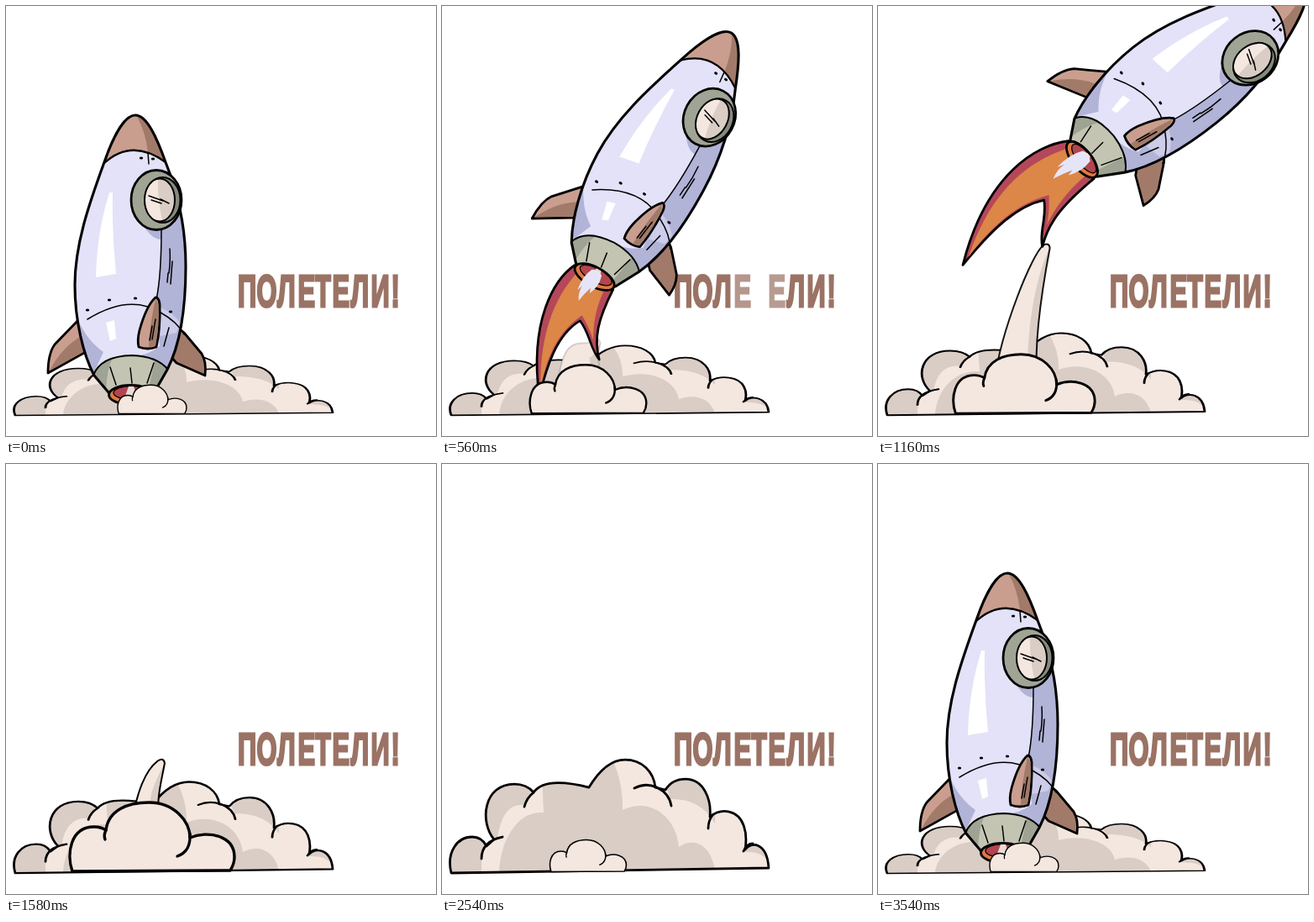
An HTML page that plays this animation: 512 by 512 pixels, repeating every 3600 ms.

```html
<!DOCTYPE html>
<html lang="ru">
<head>
<meta charset="utf-8">
<title>Rocket launch</title>
<style>
  html, body { margin: 0; width: 100%; height: 100%; overflow: hidden; background: #fff; }
  svg { display: block; width: 100%; height: 100%; }
  .ink { stroke: #000; stroke-width: 2.8; stroke-linecap: round; stroke-linejoin: round; }
  .line { fill: none; }
  .thin { fill: none; stroke-width: 1.5; }
  .light { fill: #f4e7e0; }
  .dark { fill: #d9cdc6; }
  .cone { fill: #c99e8f; }
  .fin { fill: #a27a6a; }
  .shade { fill: #b1b3d7; }
  #word { font: bold 54px "Liberation Sans", Arial, sans-serif; fill: #9b7365; stroke: #9b7365; stroke-width: 3.2; }
</style>
</head>
<body>
<svg viewBox="0 0 512 512">
  <defs>
    <path id="cloudShape" d="M11 487C5 462 18 444 36 444C44 444 50 449 53 455L62 447C44 425 50 381 86 381C97 381 105 386 109 391C118 378 140 376 175 385C190 360 205 352 218 352C238 352 252 366 254 385L266 388C272 378 282 375 290 375C312 375 321 400 319 420Q330 411 342 414C360 418 364 440 361 459C368 449 387 450 389 481Z"/>
    <path id="hull" d="M154 130C140 130 126 160 117 186C98 238 82 285 82 332C82 375 92 415 105 440L122 460C132 473 166 473 176 461L192 433C208 402 214 355 214 310C214 260 204 220 190 186C180 158 168 130 154 130Z"/>
    <clipPath id="inCloud"><use href="#cloudShape"/></clipPath>
    <clipPath id="inHull"><use href="#hull"/></clipPath>
    <clipPath id="inGlass"><ellipse cx="183" cy="231" rx="18" ry="25.5"/></clipPath>
  </defs>

  <g id="word" aria-label="ПОЛЕТЕЛИ!"></g>

  <g id="cloud">
    <use href="#cloudShape" class="light"/>
    <g clip-path="url(#inCloud)" class="dark">
      <path d="M5 490V440H54Q46 458 47 490Z"/>
      <path d="M45 375H112L99 406Q72 402 66 446L50 440Z"/>
      <path d="M119 370H175L204 354Q216 382 215 412C248 396 279 420 282 456C300 444 322 452 326 490H68C68 452 88 412 121 415Z"/>
      <path d="M262 370H325V428Q308 398 272 399Z"/>
      <path d="M360 462V448H392V478Q382 460 360 462Z"/>
    </g>
    <use href="#cloudShape" class="ink line"/>
    <path class="ink line" d="M47 470C47 455 57 447 72 444M98 408Q101 397 109 391M229 386C248 376 270 388 273 407M317 434Q317 425 322 418M359 461Q363 452 370 452"/>
  </g>

  <g id="column">
    <path id="trail" class="light"/>
    <path id="trailShade" class="dark"/>
    <path id="trailEdge" class="ink line" style="stroke-width:2"/>
  </g>

  <g id="ship">
    <g id="flame">
      <path id="flameOuter" class="ink" fill="#b4485a"/>
      <path id="flameInner" fill="#dc8647"/>
    </g>
    <g transform="translate(-148 -462)">
      <path class="ink cone" d="M86 374L58 403Q50 414 50 437L93 413Q99 395 86 374Z"/>
      <path class="fin" d="M92 392Q67 405 52 434L92 412Q96 403 92 392Z"/>
      <path class="ink fin" d="M206 384L212 389L233 414Q239 424 237 440L203 425L194 415Z"/>
      <use href="#hull" fill="#e3e2f8"/>
      <g clip-path="url(#inHull)">
        <path class="shade" d="M164 262Q174 278 185 278Q183 330 178 350L183 405Q170 416 150 417L196 435L230 360V235Z"/>
        <path class="shade" d="M85 372Q96 398 116 412L103 440L82 410Z"/>
        <path fill="#e3e2f8" d="M184 359Q200 366 207 377L203 389L184 393Z" opacity=".55"/>
        <path class="cone" d="M117 187Q150 157 190 186V120H100Z"/>
        <path class="fin" d="M154 128Q166 148 169 174Q180 178 190 186L196 150Z"/>
        <path class="ink line" d="M117 187Q150 157 190 186" style="stroke-width:2.2"/>
        <path fill="#c3c5b2" d="M98 445Q110 417 150 416Q184 418 196 436V475H98Z"/>
        <path fill="#9fa394" d="M98 448Q107 424 128 418Q118 433 119 475H98ZM177 421L200 436V475H166Z"/>
        <path class="ink line" d="M104 440Q112 417 150 416Q180 417 193 433" style="stroke-width:2"/>
        <path class="ink thin" d="M124 430L131 451M148 431L150 449M176 425L168 449"/>
      </g>
      <path fill="#fff" d="M123 222Q108 270 107 323L131 319Q126 270 127 222ZM119 377L129 374L131 396L124 399Z"/>
      <use href="#hull" class="ink line" style="stroke-width:3.1"/>
      <path class="ink thin" d="M97 373Q147 342 184 365Q204 376 212 391M185 266Q185 320 179 350M169 175L170 188M195 289Q196 304 194 318M198 304L196 331M193 318L192 329M194 383L188 405"/>
      <g>
        <ellipse class="ink" cx="179" cy="231" rx="30" ry="35.5" fill="#a0a495"/>
        <ellipse class="ink" cx="186.500" cy="231" rx="21" ry="27" fill="#858a7d" style="stroke-width:2"/>
        <ellipse class="light" cx="183" cy="231" rx="18" ry="25.5"/>
        <path clip-path="url(#inGlass)" class="dark" d="M181 204Q180 230 187 260H210V204Z"/>
        <ellipse class="ink line" cx="183" cy="231" rx="18" ry="25.5" style="stroke-width:2"/>
        <path class="ink thin" d="M170 226L187 232M173 231L185 235M184 230L194 235"/>
      </g>
      <path class="ink cone" d="M178 347Q167 357 159 386Q156 398 158 406Q169 410 179 406Q184 383 183 355Q182 347 178 347Z"/>
      <path class="fin" d="M178 349Q171 380 170 406L178 405Q183 380 181 354Z"/>
      <path class="ink thin" d="M178 373L174 397M174 381L171 398"/>
      <g id="rivets"></g>
      <ellipse class="ink" cx="148.500" cy="463" rx="26" ry="11.500" fill="#dd7b3e"/>
      <ellipse class="ink" cx="149" cy="460.500" rx="21" ry="8" fill="#b2454f" style="stroke-width:1.3"/>
      <path fill="#eadbd6" d="M146 453H152L157 467Q149 470 141 467Z"/>
    </g>
    <path id="core" fill="#e6e5f8" d="M-7 -6Q0 -10 8 -5Q12 10 5 24L3 17Q-1 28 -3 40Q-9 30 -8 20L-11 28Q-14 8 -7 -6Z"/>
  </g>

  <g id="puff">
    <path class="ink light" d="M79 485C72 465 76 432 105 432Q113 432 119 436C122 412 145 403 170 403C200 403 219 425 219 445C240 436 272 442 272 468Q272 476 267 484Z" style="stroke-width:3.400"/>
    <path class="ink line" d="M119 436Q116 442 118 447M219 440C220 455 215 463 204 467" style="stroke-width:3.400"/>
  </g>
</svg>
<script>
const LOOP = 3600;
const NS = "http://www.w3.org/2000/svg";
const $ = id => document.getElementById(id);
const clamp = v => Math.max(0, Math.min(1, v));
const show = (id, on) => { $(id).style.display = on ? "" : "none"; };
const set = (id, name, value) => $(id).setAttribute(name, value);

function add(parent, tag, attrs) {
  const el = document.createElementNS(NS, tag);
  for (const k in attrs) el.setAttribute(k, attrs[k]);
  return parent.appendChild(el);
}

// Smooth curve through [time, value...] keys, at rest at both ends.
function curve(keys, t) {
  const last = keys.length - 1;
  if (t <= keys[0][0]) return keys[0].slice(1);
  if (t >= keys[last][0]) return keys[last].slice(1);
  let i = 0;
  while (t > keys[i + 1][0]) i++;
  const a = keys[i], b = keys[i + 1], span = b[0] - a[0], p = (t - a[0]) / span;
  const slope = (n, c) => n === 0 || n === last ? 0 :
    (keys[n + 1][c] - keys[n - 1][c]) / (keys[n + 1][0] - keys[n - 1][0]);
  return a.slice(1).map((v, j) => {
    const c = j + 1, m0 = slope(i, c) * span, m1 = slope(i + 1, c) * span, q = 1 - p;
    return (1 + 2 * p) * q * q * v + p * q * q * m0 + p * p * (3 - 2 * p) * b[c] - p * p * q * m1;
  });
}

// time, nozzle x, nozzle y, tilt
const FLIGHT = [[0, 148, 462, 0], [340, 170.5, 369, 18.6], [780, 193, 277, 37],
  [1080, 215, 212, 48], [1300, 340, 105, 57], [1520, 660, -100, 62]];
const PUFF = [[0, .418], [340, .73], [780, .673], [1580, 1], [2540, .464], [3100, .418]];
// time, length, sideways bend
const FLAME = [[0, .02, 0], [340, .65, 0], [780, 1, 1], [1520, 1.05, 1]];
// time, tip x, tip y, left foot, right foot
const TRAIL = [[400, 180, 450, 140, 188], [780, 203, 292, 136, 191],
  [1100, 205, 280, 138, 190], [1580, 188, 353, 147, 183], [1720, 180, 440, 152, 181]];

const STARTS = [276, 298.5, 323, 347.5, 368, 388.5, 410.5, 434.5, 458.5];
const SQUEEZE = .57;
const letters = [..."ПОЛЕТЕЛИ!"].map((ch, i) => {
  const el = add($("word"), "text", { transform: `translate(${STARTS[i]} 357.5) scale(${SQUEEZE} 1)` });
  el.textContent = ch;
  return el;
});
for (const [cx, cy] of [[97, 362], [123, 350], [154, 348], [196, 364], [161, 181], [175, 182]])
  add($("rivets"), "ellipse", { cx, cy, rx: 2.2, ry: 1.6 });

function shipPose(t) {
  if (t < 2720) return curve(FLIGHT, t);
  const p = clamp((t - 2720) / 548);
  const ease = p < .5 ? 2 * p * p : 1 - 2 * (1 - p) ** 2;
  return [148 - 240 * (1 - ease), 462, 0];
}

function drawFlame(t) {
  const on = t >= 40 && t < 1520;
  show("flame", on);
  show("core", on);
  const [power, bend] = curve(FLAME, t);
  const near = -34 - 12 * bend, far = -30 - 26 * bend;
  set("flameOuter", "d", `M-27 0C${near} 30 ${far} 95 10 180C1 140 -7 95 10 63C28 72 36 90 52 97C34 75 28 50 27 4Z`);
  set("flameInner", "d", `M-19 2C${near + 12} 40 ${far + 14} 95 7 170C-4 130 -8 92 9 55C18 62 25 66 35 78C24 55 18 32 18 4Z`);
  const width = Math.min(1, .3 + power * 1.1);
  set("flame", "transform", `scale(${width} ${power})`);
  set("core", "transform", `scale(${Math.min(1, .3 + power * .7)} ${power})`);
}

function drawTrail(t) {
  const on = t > 400 && t < 1720;
  show("column", on);
  if (!on) return;
  const [x, y, l, r] = curve(TRAIL, t);
  const edge = `M${l} 445C${l + 8} 385 ${x - 20} ${y + 10} ${x - 7} ${y}Q${x} ${y - 4} ${x + 1} ${y + 3}`;
  const right = `C${x - 6} ${y + 40} ${r - 4} 395 ${r} 445`;
  set("trail", "d", edge + right + "Z");
  set("trailEdge", "d", edge + right);
  set("trailEdge", "opacity", .15 + .85 * clamp((t - 800) / 400));
  set("trailShade", "d",
    `M${x + 1} ${y + 3}${right}H${r - 11}C${r - 13} 395 ${x - 18} ${y + 40} ${x + 1} ${y + 3}Z`);
}

function draw(t) {
  const swell = t < 2540 ? (t / 2540) ** 1.12 : 1 - clamp((t - 2540) / 1000);
  set("cloud", "transform", `translate(0 488) scale(1 ${.527 + .473 * swell}) translate(0 -488)`);

  const [x, y, tilt] = shipPose(t);
  set("ship", "transform", `translate(${x} ${y}) rotate(${tilt})`);
  show("ship", t <= 1520 || t > 2720);

  drawFlame(t);
  drawTrail(t);
  set("puff", "transform", `translate(174 486) scale(${curve(PUFF, t)[0]}) translate(-174 -486)`);

  const wave = (t - 228) / 83;
  letters.forEach((el, i) => el.setAttribute("opacity", clamp((Math.abs(i - wave) - .35) / .9)));
}

const start = performance.now();
function tick() {
  draw((performance.now() - start) % LOOP);
  requestAnimationFrame(tick);
}
tick();
</script>
</body>
</html>
```
